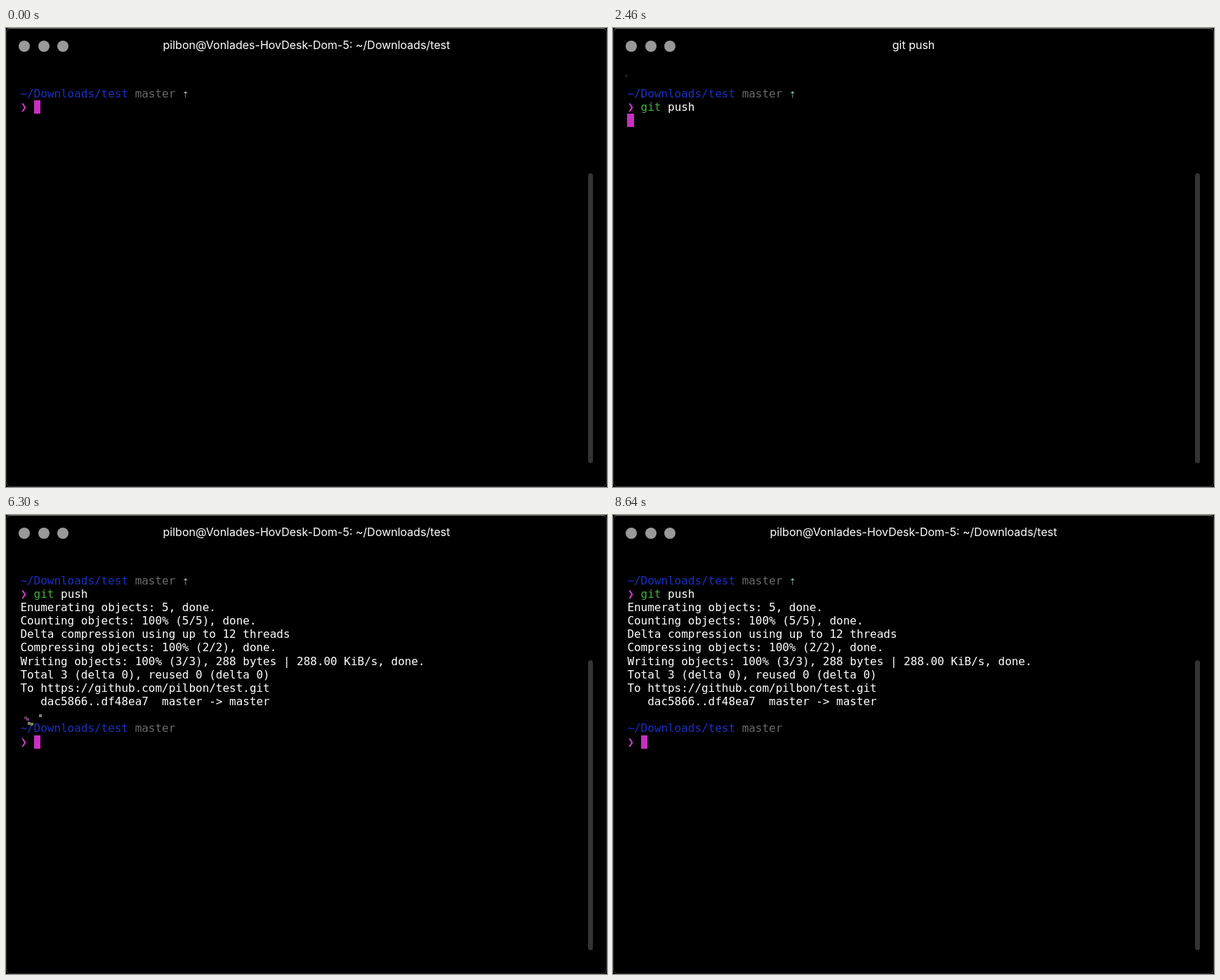
Recreate the animation shown at these times as an HTML page with a canvas. Size 856 by 654 pixels, loop 8820 ms.

```html
<!DOCTYPE html>
<html lang="en">
<head>
<meta charset="utf-8">
<title>Terminal</title>
<style>
  html, body { margin: 0; width: 100%; height: 100%; overflow: hidden; background: #000; }
  #win { position: absolute; left: 0; top: 0; width: 856px; height: 654px; overflow: hidden; background: #000; }
  #edge { position: absolute; inset: 0; border: 1px solid #333; border-top-color: #787878; border-radius: 6px; }
  .dot { position: absolute; top: 18px; width: 16px; height: 16px; border-radius: 50%; background: #999; }
  #title { position: absolute; top: 14px; width: 100%; text-align: center; color: #fff;
    font: 16px/20px Inter, sans-serif; white-space: pre; }
  #bar { position: absolute; left: 828.5px; top: 206.5px; width: 7px; height: 413.5px; border-radius: 3.5px; background: #333; }
  .row { position: absolute; left: 20.4px; height: 19.17px; color: #fff; white-space: pre;
    font: 16px/19.17px "DejaVu Sans Mono", monospace; letter-spacing: -.03px; }
  #cursor { position: absolute; width: 9.6px; height: 19.2px; background: #c82fc1; }
  .blue { color: #1a30c2; }
  .grey { color: #6a6a6a; }
  .cyan { color: #8cc4a8; }
  .pink { color: #c93cc6; }
  .green { color: #45ae3c; }
  svg, canvas { position: absolute; left: 0; top: 0; }
</style>
</head>
<body>
<div id="win">
  <div id="bar"></div>
  <div class="dot" style="left:18px"></div>
  <div class="dot" style="left:45.5px"></div>
  <div class="dot" style="left:72.5px"></div>
  <div id="title"></div>
  <div id="cursor"></div>
  <div id="rows"></div>
  <svg width="856" height="654">
    <defs>
      <linearGradient id="shine" x1="0" y1="0" x2="0" y2="1">
        <stop offset="0" stop-color="#a8a8aa"/>
        <stop offset="1" stop-color="#dcdcde"/>
      </linearGradient>
      <clipPath id="hull"><path d="M701 209V36C703 18 709 0 719 0S735 18 737 36V209L733 205H705Z"/></clipPath>
    </defs>
    <g id="rocket">
      <path d="M701 209L705 205H733L737 209Z" fill="#0e0e0e"/>
      <g id="fins" fill="#444">
        <path d="M701 131L695 136L701 184Z"/>
        <path d="M737 131L743 132L737 184Z"/>
      </g>
      <g clip-path="url(#hull)">
        <rect x="701" y="0" width="36" height="209" fill="#929294"/>
        <rect x="705" y="0" width="14" height="209" fill="#b0b0b2"/>
        <rect x="719" y="40" width="14" height="169" fill="#dcdcde"/>
        <rect x="719" y="0" width="14" height="41" fill="url(#shine)"/>
      </g>
      <path d="M705 27V48H692C692 37 697 29 705 27ZM733 27V48H746C746 37 741 29 733 27Z" fill="#3d3d3d"/>
      <path d="M701 131H737C737 139 730 144 719 144S701 139 701 131Z" fill="#3d3d3d"/>
      <g id="flame">
        <path d="M-9 0H9C12 3 14 10 14 18C14 31 8 41 0 41S-14 31 -14 18C-14 10 -12 3 -9 0Z" fill="#ff5a00"/>
        <path d="M-9 0H9C10 4 10.500 8 10.500 13C10.500 23 6 31 0 31S-10.500 23 -10.500 13C-10.500 8 -10 4 -9 0Z" fill="#ffc400"/>
        <path d="M-5 0H5C6 3 6 6 6 9C6 15 4 20 0 20S-6 15 -6 9C-6 6 -6 3 -5 0Z" fill="#fff200"/>
      </g>
    </g>
  </svg>
  <canvas id="sparks" width="856" height="654"></canvas>
  <div id="edge"></div>
</div>
<script>
const LOOP = 8820, STEP = 60;
const X0 = 20.4, Y0 = 83.5, CW = 9.6, RH = 19.17;
const KEY = 300, GAP = 100, ENTER = 1560, OUTPUT = 3420, TOTAL = 3480, DONE = 6120;
const HOME = 'pilbon@Vonlades-HovDesk-Dom-5: ~/Downloads/test';
const CMD = 'git push';

const $ = id => document.getElementById(id);
const span = (cls, text) => `<span class="${cls}">${text}</span>`;
const path = span('blue', '~/Downloads/test') + ' ' + span('grey', 'master');
const arrow = span('pink', '❯') + ' ';

// [row, time shown, markup]
const lines = [
  [0, 0, path + ' ' + span('cyan', '⇡')],
  [1, 0, ''],
  [2, OUTPUT, 'Enumerating objects: 5, done.'],
  [3, OUTPUT, 'Counting objects: 100% (5/5), done.'],
  [4, OUTPUT, 'Delta compression using up to 12 threads'],
  [5, OUTPUT, 'Compressing objects: 100% (2/2), done.'],
  [6, TOTAL, 'Writing objects: 100% (3/3), 288 bytes | 288.00 KiB/s, done.'],
  [7, TOTAL, 'Total 3 (delta 0), reused 0 (delta 0)'],
  [8, DONE, 'To https://github.com/pilbon/test.git'],
  [9, DONE, '   dac5866..df48ea7  master -&gt; master'],
  [11, DONE, path],
  [12, DONE, arrow]
].map(([row, at, html]) => {
  const el = document.createElement('div');
  el.className = 'row';
  el.style.top = Y0 + row * RH + 'px';
  el.innerHTML = html;
  $('rows').append(el);
  return { el, at };
});
const prompt = lines[1].el;

// cursor stops: [time, column, row]
const stops = [[0, 2, 1]];
for (let i = 0; i < CMD.length; i++) stops.push([KEY + i * GAP, 3 + i, 1]);
stops.push([ENTER, 0, 2], [OUTPUT, 0, 6], [TOTAL, 0, 8], [DONE, 2, 12]);

let seed = 11;
const rand = () => (seed = (seed * 16807) % 2147483647) / 2147483647;
const tints = ['#fff', '#c7c7c7', '#c7c7c7', '#686868', '#686868', '#c51e14', '#1a30e0', '#c7c329', '#c839c5'];
const sparks = [];
for (const [at, col, row] of stops.slice(1)) {
  if (at === OUTPUT) continue;
  for (let i = 0; i < 5; i++) sparks.push({
    at,
    x: X0 + col * CW,
    y: Y0 + row * RH,
    vx: rand() * 2.6 - 1.3,
    vy: -1.5 - rand() * 2,
    tint: tints[Math.floor(rand() * tints.length)]
  });
}

const ctx = $('sparks').getContext('2d');
function drawSparks(t) {
  ctx.clearRect(0, 0, 856, 654);
  for (const s of sparks) {
    const n = (t - s.at) / 16.67;
    const alpha = .96 ** n;
    if (n < 0 || alpha < .09) continue;
    ctx.globalAlpha = alpha;
    ctx.fillStyle = s.tint;
    ctx.fillRect(Math.round(s.x + s.vx * n) - 2, Math.round(s.y + s.vy * n + .0375 * n * n) - 2, 4, 4);
  }
}

function drawRocket(t) {
  const shown = t >= DONE && t < 8160;
  $('rocket').style.display = shown ? '' : 'none';
  if (!shown) return;
  const top = 406 - (t - 6960) * 361 / 600;
  const flare = .895 - .105 * Math.cos((t - 6960) / 400 * 2 * Math.PI);
  const fold = Math.min(1, Math.max(0, 1 - (t - 6960) / 600));
  const spread = .75 + .25 * fold;
  $('rocket').setAttribute('transform', `translate(0 ${top.toFixed(2)})`);
  $('flame').setAttribute('transform', `translate(720 219) scale(${flare.toFixed(3)})`);
  $('fins').setAttribute('transform', `translate(719 0) scale(${spread.toFixed(3)} 1) translate(-719 0)`);
}

let typed = -1;
function draw(t) {
  const count = t < KEY ? 0 : Math.min(CMD.length, Math.floor((t - KEY) / GAP) + 1);
  if (count !== typed) {
    typed = count;
    prompt.innerHTML = arrow + span('green', CMD.slice(0, Math.min(3, count))) + CMD.slice(3, count);
  }
  for (const { el, at } of lines) el.style.visibility = t >= at ? 'visible' : 'hidden';
  $('title').textContent = t >= ENTER && t < DONE ? CMD : HOME;
  const [, col, row] = stops.filter(s => s[0] <= t).pop();
  $('cursor').style.left = X0 + col * CW + 'px';
  $('cursor').style.top = Y0 + row * RH + 'px';
  drawRocket(t);
  drawSparks(t);
}

const start = performance.now();
function tick() {
  const t = (performance.now() - start) % LOOP;
  draw(Math.floor(t / STEP) * STEP);
  requestAnimationFrame(tick);
}
tick();
</script>
</body>
</html>
```
